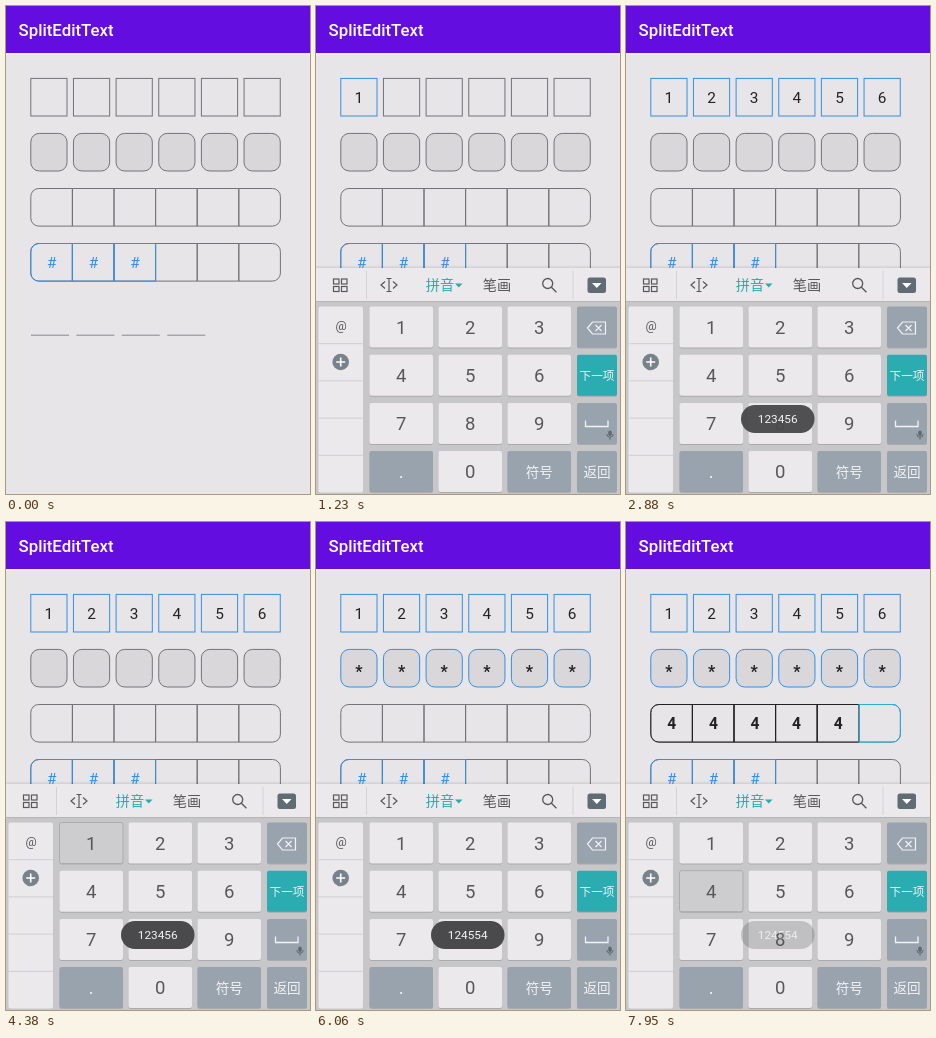
Animation of 304x488 px, one loop 8000 ms. Source, as an HTML page:

```html
<!DOCTYPE html>
<html lang="zh">
<head>
<meta charset="utf-8">
<style>
  html, body { margin: 0; width: 100%; height: 100%; overflow: hidden; background: #e7e5e8; }
  svg { display: block; width: 100vw; height: 100vh; }
  text { font-family: Roboto, "Noto Sans CJK SC", "Noto Sans CJK", sans-serif; text-anchor: middle; }
</style>
</head>
<body>
<svg id="stage" viewBox="0 0 304 488">
  <defs>
    <linearGradient id="shade" x2="0" y2="1">
      <stop stop-color="#000" stop-opacity="0"/>
      <stop offset="1" stop-color="#000" stop-opacity=".1"/>
    </linearGradient>
  </defs>
  <rect width="304" height="488" fill="#e7e5e8"/>
  <rect y="47" width="304" height="2" fill="#efedf2"/>
  <rect width="304" height="47" fill="#640de0"/>
  <text x="12.6" y="29.8" font-size="16.8" font-weight="500" fill="#fff" style="text-anchor:start">SplitEditText</text>
  <g id="fields"></g>
  <g id="board"></g>
  <g id="toast">
    <rect x="115" y="399" width="73.5" height="28" rx="14" fill="#4a4a4c"/>
    <text id="message" x="151.7" y="417.3" font-size="11.8" fill="#f4f4f4"></text>
  </g>
</svg>
<script>
const LOOP = 8000;
const GREY = '#747276', BLUE = '#3390e4', CYAN = '#22b2dc', BLACK = '#222';
const $ = id => document.getElementById(id);

// Key presses per field row: [down, up, digit]
const presses = [
  [[1170, 1230, 1], [1380, 1470, 2], [1650, 1710, 3], [1920, 1980, 4], [2160, 2220, 5], [2400, 2460, 6]],
  [[4380, 4440, 1], [4620, 4680, 2], [4830, 4890, 4], [5130, 5160, 5], [5310, 5340, 5], [5520, 5580, 4]],
  [[6900, 6960, 4], [7050, 7110, 4], [7290, 7350, 4], [7500, 7560, 4], [7710, 7770, 4], [7950, 8010, 4]]
];
const FOCUS_AT = 6360;
const toasts = [
  { text: '123456', start: 2480, end: 4400 },
  { text: '124554', start: 5560, end: 7520 }
];

const rect = (x, y, w, h, fill, extra = '') =>
  `<rect x="${x}" y="${y}" width="${w}" height="${h}" fill="${fill}" ${extra}/>`;
const text = (x, y, size, fill, s, extra = '') =>
  `<text x="${x}" y="${y}" font-size="${size}" fill="${fill}" ${extra}>${s}</text>`;
const line = (d, color, width = 1, fill = 'none') =>
  `<path d="${d}" fill="${fill}" stroke="${color}" stroke-width="${width}"/>`;

// Cell of a joined field; the outer corners are round
function cell(i, y, color) {
  const x = 24.8 + i * 41.6, r = 8, w = 41.6, h = 37.6;
  const d = i === 0 ? `M${x + w} ${y}h${r - w}a${r} ${r} 0 0 0 ${-r} ${r}v${h - 2 * r}a${r} ${r} 0 0 0 ${r} ${r}h${w - r}z`
    : i === 5 ? `M${x} ${y}h${w - r}a${r} ${r} 0 0 1 ${r} ${r}v${h - 2 * r}a${r} ${r} 0 0 1 ${-r} ${r}h${r - w}z`
    : `M${x} ${y}h${w}v${h}h${-w}z`;
  return line(d, color);
}

function drawFields([first, second, third], focused) {
  let out = '', over = '';
  for (let i = 0; i < 6; i++) {
    const x = 24.8 + i * 42.65, mid = x + 18.1, joined = 45.8 + i * 41.6;
    out += rect(x, 72.4, 36.2, 37.6, 'none', `stroke="${i < first ? BLUE : GREY}"`);
    if (i < first) out += text(mid, 97.4, 15.4, BLACK, presses[0][i][2]);
    out += rect(x, 127.4, 36.2, 37.6, '#d9d7da', `rx="8.5" stroke="${i < second ? BLUE : GREY}"`);
    if (i < second) out += text(mid, 155, 16, BLACK, '*', 'font-weight="700"');
    out += cell(i, 182.5, GREY) + cell(i, 237.5, GREY);
    if (i < third) {
      over += cell(i, 182.5, BLACK) + text(joined, 207.3, 15.6, BLACK, 4, 'font-weight="700"');
    } else if (i === third && focused) over += cell(i, 182.5, CYAN);
    if (i < 3) over += cell(i, 237.5, BLUE) + text(joined, 262.3, 15.4, BLUE, '#');
    if (i < 4) out += line(`M${25 + i * 45.4} 329.2h38`, '#89878b');
  }
  $('fields').innerHTML = out + over;
}

function buildBoard() {
  const ink = '#58585a', dim = '#99a3ae', teal = '#2aacb0', pale = '#ebe9ec';
  const rowY = r => 300.5 + r * 48.2;
  const key = (x, r, w, fill, id = '') =>
    rect(x, rowY(r) + 1, w, 41, '#aaa9ac', 'rx="2"') + rect(x, rowY(r), w, 41, fill, `rx="2" ${id}`);
  let s = rect(0, 259, 304, 3, 'url(#shade)') + rect(0, 262, 304, 34, pale) +
    rect(0, 295, 304, 193, '#c7c6c9') + line('M0 295.5h304', '#b5b4b7');

  // Toolbar
  for (const x of [17.5, 25.5]) for (const y of [273, 280.5]) s += rect(x, y, 5.5, 5, 'none', `stroke="${ink}" stroke-width="1.2"`);
  s += line('M50.5 265v28M257 265v28', '#d3d2d5') +
    line('M69 275.5l-4 3.5 4 3.5M77 275.5l4 3.5-4 3.5M73 272.5v13M70.5 272.5h5M70.5 285.5h5', ink, 1.2) +
    text(124, 284.2, 14.2, teal, '拼音') + `<path d="M139 277.5h7.5l-3.75 4z" fill="${teal}"/>` +
    text(181, 284.2, 14.2, ink, '笔画') +
    `<circle cx="231.7" cy="277.5" r="5" fill="none" stroke="${ink}" stroke-width="1.3"/>` +
    line('M235.4 281.2l5 5', ink, 1.3) +
    rect(271.5, 271.5, 18.5, 15.5, '#5f6c73', 'rx="2.5"') + '<path d="M276 277h9.5l-4.75 5z" fill="#fff"/>';

  // Side column
  s += rect(2.5, 300.5, 44.5, 186, pale, 'rx="2"');
  for (let i = 1; i < 5; i++) s += line(`M2.5 ${300.5 + i * 37.2}h44.5`, '#cfced1');
  s += text(25, 324.2, 12.5, ink, '@') + '<circle cx="24.7" cy="356" r="8.3" fill="#78828b"/>' +
    line('M20.2 356h9M24.7 351.5v9', '#fff', 1.6);

  // Digits and bottom row
  const keys = [1, 2, 3, 4, 5, 6, 7, 8, 9, '.', 0, '符号'];
  keys.forEach((k, i) => {
    const r = Math.floor(i / 3), x = 53.5 + (i % 3) * 69, plain = typeof k === 'number';
    s += key(x, r, 63.5, plain ? pale : dim, `id="key${i}"`) +
      text(x + 31.8, rowY(r) + (k === '符号' ? 25.8 : 27.2), k === '符号' ? 13.6 : 18.5, plain ? ink : '#f2f2f4', k);
  });

  // Action column
  for (let r = 0; r < 4; r++) s += key(261, r, 40, r === 1 ? teal : dim);
  s += line('M271.5 322l5-6h13v12h-13zM279.5 319l6 6M285.5 319l-6 6', '#f2f2f4', 1.2) +
    text(281, 374.3, 11.6, '#f4f4f4', '下一项') +
    line('M269.5 414.5v6h22.5v-6', '#f2f2f4', 1.3) +
    rect(292.3, 424.5, 3.4, 5.5, '#5d6873', 'rx="1.7"') + line('M290.8 428a3.2 3.2 0 0 0 6.4 0M294 431.2v2.5', '#5d6873') +
    text(281, rowY(3) + 25.8, 13.6, '#f2f2f4', '返回');
  $('board').innerHTML = s;
}

const clamp = v => Math.max(0, Math.min(1, v));
let shown = '';

function render(t) {
  const counts = presses.map(row => row.filter(p => t >= p[1]).length);
  const focused = t >= FOCUS_AT;
  const state = counts + '/' + focused;
  if (state !== shown) drawFields(counts, focused);
  shown = state;

  const slide = (1 - clamp((t - 480) / 420)) ** 2.5;
  $('board').setAttribute('transform', `translate(0 ${slide * 232})`);

  const held = presses.flat().find(p => t >= p[0] && t < p[1]);
  for (let i = 0; i < 9; i++) {
    const down = held && held[2] === i + 1;
    $('key' + i).setAttribute('fill', down ? '#cdccce' : '#ebe9ec');
    $('key' + i).setAttribute('stroke', down ? '#acabae' : 'none');
  }

  const note = toasts[t < 5200 ? 0 : 1];
  const enter = clamp((t - note.start) / 500), leave = clamp((t - note.end) / 500);
  $('message').textContent = note.text;
  $('toast').setAttribute('opacity', (1 - (1 - enter) ** 2) * (1 - leave ** 2));
}

function tick() {
  render(performance.now() % LOOP);
  requestAnimationFrame(tick);
}
buildBoard();
tick();
</script>
</body>
</html>
```
